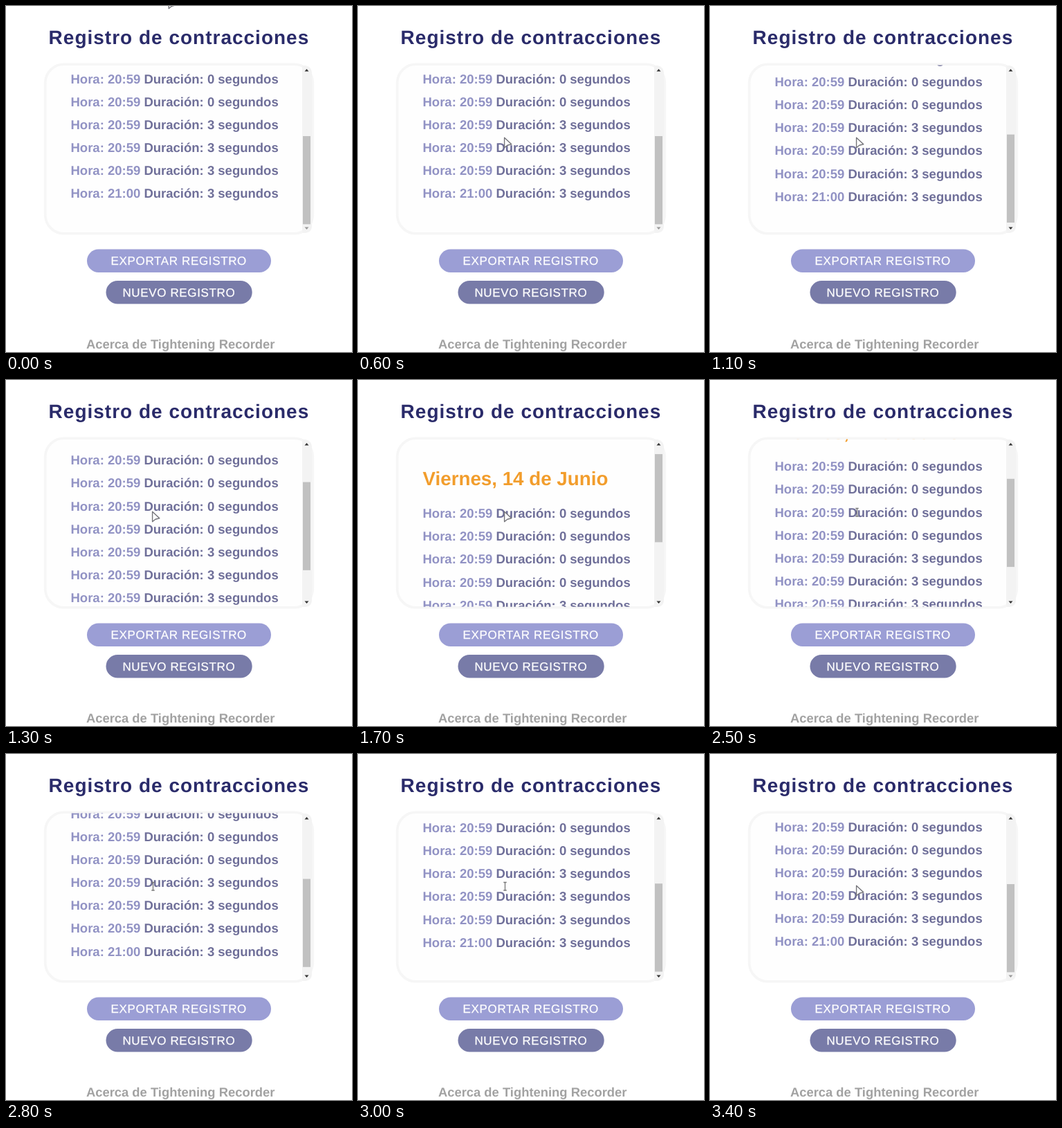
Animation of 500 by 500 pixels, one loop 3.8 s. Source, as an HTML page:

```html
<!DOCTYPE html>
<html lang="es">
<head>
<meta charset="utf-8">
<title>Registro de contracciones</title>
<style>
  html, body { margin: 0; width: 100%; height: 100%; overflow: hidden; background: #fff; }
  svg { display: block; width: 100vw; height: 100vh; }
  text { font-family: "Liberation Sans", Arial, sans-serif; font-weight: bold; font-size: 18.5px; text-rendering: geometricPrecision; }
  .title { font-size: 28px; letter-spacing: 1px; fill: #2a2b6a; }
  .day { font-size: 27.75px; fill: #f29d2c; }
  .hour { fill: #9192c4; }
  .length { fill: #6f6f99; }
  .button { font-size: 17px; font-weight: normal; letter-spacing: .64px; fill: #fff; stroke: #fff; stroke-width: .25px; }
  .about { font-size: 18.4px; fill: #a2a2a2; }
</style>
</head>
<body>
<svg viewBox="0 0 500 500">
  <defs>
    <clipPath id="view"><rect x="60" y="85.5" width="368" height="242.3"/></clipPath>
  </defs>
  <rect width="500" height="500" fill="#fff"/>
  <text class="title" x="61.6" y="55">Registro de contracciones</text>

  <rect x="56.7" y="84.2" width="386.6" height="244.6" rx="27" fill="#fefefe" stroke="#f6f6f6" stroke-width="3.6"/>
  <g clip-path="url(#view)">
    <g id="list"><text class="day" x="93.5" y="169.6">Viernes, 14 de Junio</text></g>
  </g>

  <path d="M428 86H433Q442 88 442 97V318Q442 327 433 328H428Z" fill="#f3f3f3"/>
  <rect id="thumb" x="429" width="11" height="127.3" fill="#c1c1c1"/>
  <path id="up" d="M431.5 94.5L434.5 91 437.5 94.5Z"/>
  <path id="down" d="M431.5 319.5L434.5 323 437.5 319.5Z"/>

  <rect x="117" y="351.5" width="266" height="33.5" rx="16.7" fill="#9b9ed5"/>
  <text class="button" x="151.6" y="374">EXPORTAR REGISTRO</text>
  <rect x="144.5" y="397" width="211.2" height="33.5" rx="16.7" fill="#787ba8"/>
  <text class="button" x="168.4" y="419.5">NUEVO REGISTRO</text>
  <text class="about" x="115.9" y="495">Acerca de Tightening Recorder</text>

  <path id="arrow" d="M0 0V14.5L4.3 11 10.2 9.5Z" fill="#fff" stroke="#75757a" stroke-width="1.4" stroke-linejoin="round"/>
  <path id="beam" d="M210.3 185.5H214.7M212.5 185.5V197M210.3 197H214.7" fill="none" stroke="#777" stroke-width="1.3"/>
</svg>
<script>
const LOOP = 3800, STEP = 100, MAX = 171, PITCH = 33.15;
const $ = id => document.getElementById(id);
const mix = (a, b, p) => a + (b - a) * p;
const span = (t, a, b) => Math.min(1, Math.max(0, (t - a) / (b - a)));

function make(tag, parent, attrs) {
  const el = document.createElementNS("http://www.w3.org/2000/svg", tag);
  for (const k in attrs) el.setAttribute(k, attrs[k]);
  return parent.appendChild(el);
}

for (let i = 0; i < 8; i++) {
  const row = make("text", $("list"), { x: 93.5, y: 216.2 + i * PITCH });
  make("tspan", row, { class: "hour" }).textContent = `Hora: ${i < 7 ? "20:59" : "21:00"} `;
  make("tspan", row, { class: "length" }).textContent = `Duración: ${i < 4 ? 0 : 3} segundos`;
}

// Wheel scrolling: quick start, long ease out, first up and then down.
function scrollAt(t) {
  if (t < 1100) return mix(MAX, 166.5, span(t, 1000, 1100));
  if (t < 1300) return mix(166.5, 94, span(t, 1100, 1300));
  if (t < 2300) return 94 * (1 - span(t, 1300, 2200)) ** 2.9;
  if (t < 2500) return 85 * span(t, 2300, 2500) ** 1.5;
  return MAX - 86 * (1 - span(t, 2500, 3200)) ** 3.2;
}

function draw(t) {
  const s = scrollAt(t);
  $("list").setAttribute("transform", `translate(0 ${-s})`);
  $("thumb").setAttribute("y", 98.1 + s * 0.526);
  $("up").setAttribute("fill", s < 0.3 ? "#999" : "#333");
  $("down").setAttribute("fill", s > MAX - 0.3 ? "#999" : "#333");

  const p = span(t, 0, 600), e = p * p * (3 - 2 * p);
  $("arrow").setAttribute("transform", `translate(${mix(235.2, 211.6, e)} ${mix(-10.7, 190.3, e)})`);
  const text = t >= 2400 && t < 3400;
  $("arrow").style.display = text ? "none" : "";
  $("beam").style.display = text ? "" : "none";
}

const start = performance.now();
function tick() {
  const t = (performance.now() - start) % LOOP;
  draw(Math.floor(t / STEP) * STEP);
  requestAnimationFrame(tick);
}
draw(0);
requestAnimationFrame(tick);
</script>
</body>
</html>
```
